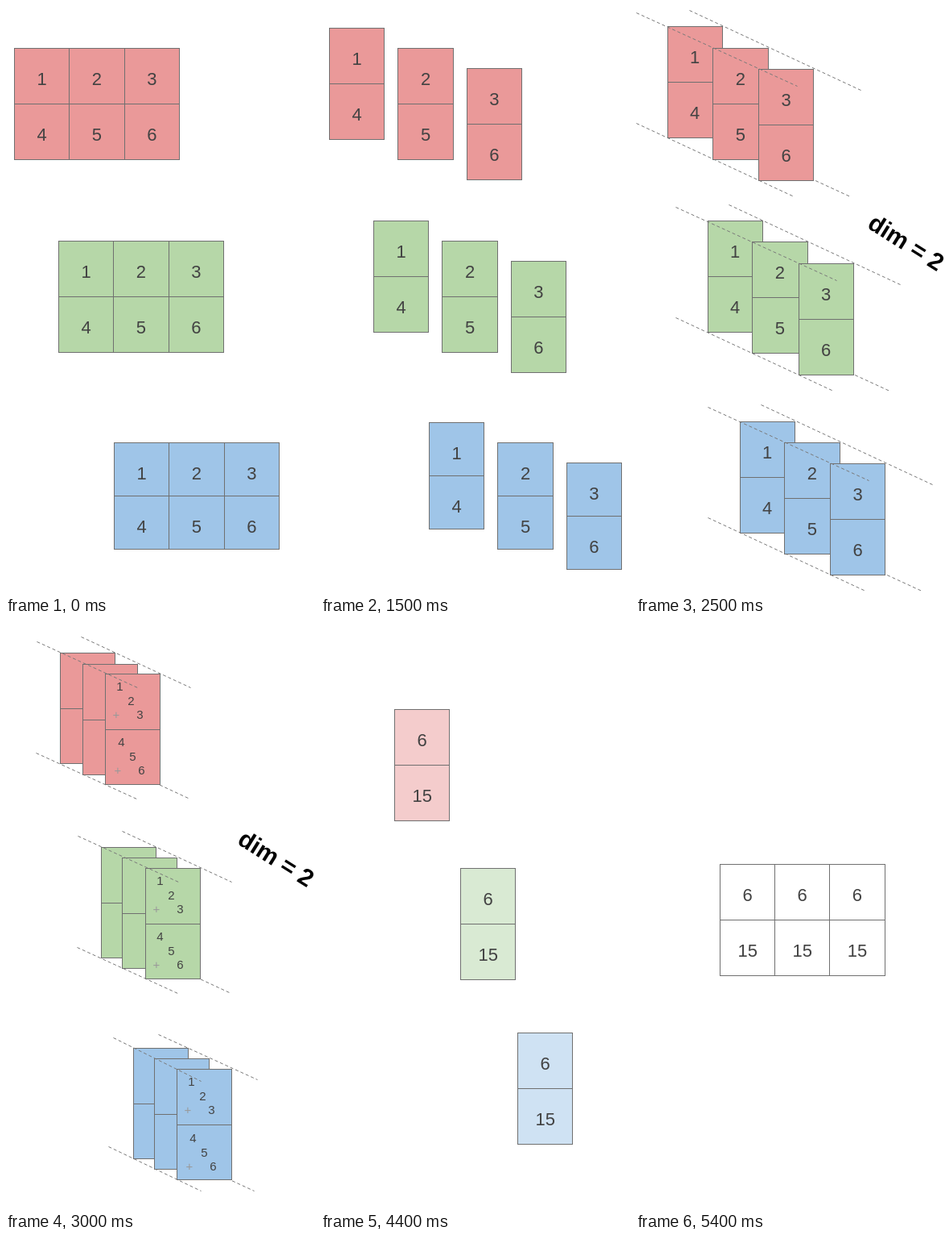
Write an HTML page that moves like this. It is 384 px wide and 729 px high and loops after 6600 ms.

```html
<!DOCTYPE html>
<html lang="en">
<head>
<meta charset="utf-8">
<title>Sum along dim 2</title>
<style>
  html, body { margin: 0; width: 100%; height: 100%; overflow: hidden; background: #fff; }
  svg { display: block; width: 384px; height: 729px; }
  rect, line { stroke: #707070; stroke-width: 1; }
  .dash { stroke: #7a7a7a; stroke-dasharray: 4 3; }
  text { font: 22px "Liberation Sans", Arial, sans-serif; fill: #434343; text-anchor: middle; }
  .small { font-size: 15px; }
  .plus { font-size: 15px; fill: #999; }
  .dim { font-size: 30px; font-weight: bold; fill: #000; }
</style>
</head>
<body>
<svg id="stage" viewBox="0 0 384 729"></svg>
<script>
const W = 68.3, H = 138, LOOP = 6600;
const strong = ['#ea9999', '#b6d7a8', '#9fc5e8'];
const pale = ['#f4cccc', '#d9ead3', '#cfe2f3'];
const white = ['#fff', '#fff', '#fff'];

// Top left corner of the first column of each matrix
const flat = [[10, 52], [65, 291], [134, 541]];
const spread = [[10, 12], [59, 253], [99, 501]];
const stacked = [
  [[67, 38], [95, 52], [123, 64]],
  [[118, 279], [144, 292], [173, 305]],
  [[158, 528], [184, 541], [212, 554]]
];

// Guide lines, relative to the first column: two in front, two behind
const longGuides = [[-10, -4, 190, 87], [56, -7, 269, 92], [-10, 133, 186, 224], [60, 134, 256, 224]];
const shortGuides = [[-29, -14, 96, 43], [26, -20, 162, 43], [-30, 124, 95, 181], [60, 134, 159, 180]];
const blueGuides = [[-25, -13, 84, 41], [31, -17, 154, 39], [-31, 122, 84, 177], [59, 135, 150, 177]];

const snap = Math.round;
const mix = (a, b, t) => a + (b - a) * t;

const line = ([x1, y1, x2, y2], cls = '') =>
  `<line class="${cls}" x1="${x1}" y1="${y1}" x2="${x2}" y2="${y2}"/>`;

const label = (s, x, y, cls = '') => `<text class="${cls}" x="${x}" y="${y}">${s}</text>`;

function column(x, y, fill, labels, h = H) {
  const left = snap(x), right = snap(x + W), top = snap(y), mid = top + snap(h / 2);
  return `<rect x="${left}" y="${top}" width="${right - left}" height="${h}" fill="${fill}"/>` +
    line([left, mid, right, mid]) +
    labels.map((s, r) => label(s, x + W / 2, top + r * h / 2 + 45)).join('');
}

function guides(set, [x, y]) {
  const lines = set.map(([a, b, c, d]) => line([x + a, y + b, x + c, y + d], 'dash'));
  return { back: lines.slice(2).join(''), front: lines.slice(0, 2).join('') };
}

const dimLabel = '<g transform="translate(335.5 292.3) rotate(32)">' + label('dim = 2', 0, 10.7, 'dim') + '</g>';

const columns = (cols, fill, h) =>
  cols.map(([x, y], c) => column(x, y, fill, [c + 1, c + 4], h)).join('');

// Columns side by side; lift shears the outer ones up and down
function row(step, lift = 0) {
  return flat.map(([x, y], m) => {
    const cols = [-1, 0, 1].map((k, c) => [x + c * step, y + k * lift]);
    return columns(cols, strong[m], m === 2 ? 132 : H);
  }).join('');
}

// Sheared columns between guides, drawn together by t
function sheared(t) {
  return spread.map((p, m) => {
    const g = guides(longGuides, p);
    const cols = stacked[m].map(([sx, sy], c) =>
      [mix(p[0] + c * 85.5, sx, t), mix(p[1] + c * 39.5, sy, t)]);
    return g.back + columns(cols, strong[m]) + g.front;
  }).join('') + dimLabel;
}

function sumLabels([x, y], m) {
  const dx = m === 1 ? 0 : 2, dy = m === 2 ? 70 : 69;
  return [0, 1].map(r => {
    const ox = x + r * dx, oy = y + r * dy + 5;
    return [[18, 15], [32, 33], [43, 50.5]].map(([a, b], i) =>
      label(1 + i + 3 * r, ox + a, oy + b, 'small')).join('') +
      label('+', ox + 13.5, oy + 50.5, 'plus');
  }).join('');
}

function stack(fills, shift) {
  return stacked.map((cols, m) => {
    const moved = cols.map(([x, y]) => [x + (m - 1) * shift, y]);
    const g = guides(m === 2 ? blueGuides : shortGuides, moved[0]);
    return g.back + moved.map(([x, y]) => column(x, y, fills[m], [], H - 1)).join('') +
      g.front + sumLabels(moved[2], m);
  }).join('');
}

const sums = (places, fills) =>
  places.map(([x, y], m) => column(x, y, fills[m], [6, 15])).join('');

const scenes = [
  [0, row(W)],
  [1000, row(85.4)],
  [1500, row(85.4, 25)],
  [2000, sheared(0)],
  [2500, sheared(0.5)],
  [3000, stack(strong, 0) + dimLabel],
  [3700, stack(pale, 13)],
  [4400, sums([[91, 108], [173, 305], [244, 509]], pale)],
  [4900, sums([[104, 170], [173, 305], [240.3, 444]], pale)],
  [5400, sums([[104, 300], [172, 300], [240.3, 300]], white)]
];

const stage = document.getElementById('stage');
const start = performance.now();
let shown = -1;

function draw(now) {
  const t = Math.max(0, now - start) % LOOP;
  const i = scenes.filter(([at]) => at <= t).length - 1;
  if (i !== shown) {
    shown = i;
    stage.innerHTML = `<g transform="translate(.5 .5)">${scenes[i][1]}</g>`;
  }
  requestAnimationFrame(draw);
}
draw(start);
</script>
</body>
</html>
```
